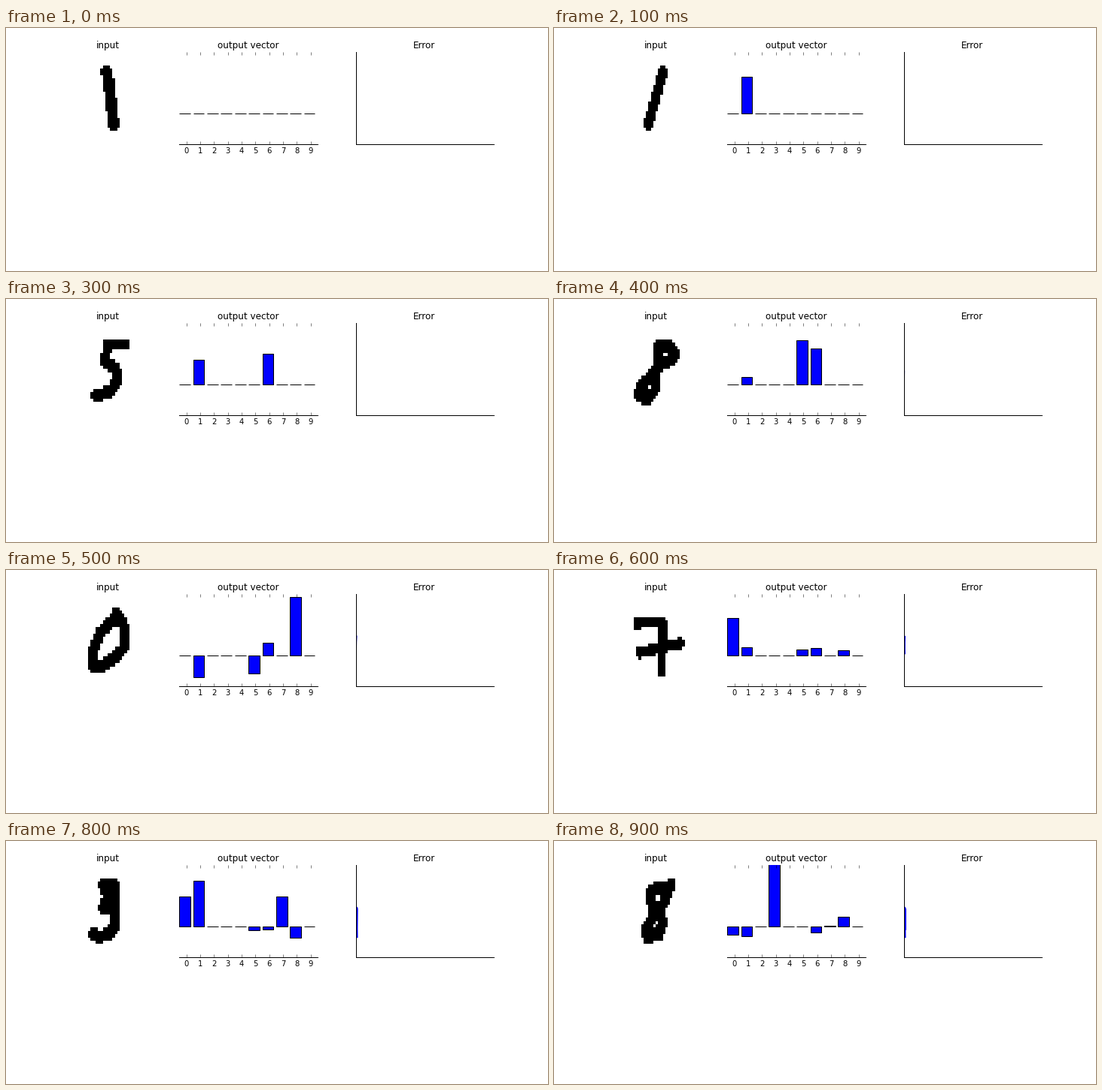
These frames come from a looping animation (720 by 324 pixels, 1 s). A matplotlib script:

```python
import numpy as np
import matplotlib.pyplot as plt
from matplotlib.animation import FuncAnimation

plt.rcParams.update({
    "font.family": "DejaVu Sans", "font.size": 10,
    "axes.titlesize": 12, "axes.titlepad": 5, "axes.linewidth": 1,
})
GRID = 28
BLUE = "#0000ff"


def draw_digit(*strokes, radius=2.0):
    """Rasterise pen strokes, given by key points (x, y) in cells."""
    rows, cols = np.mgrid[:GRID, :GRID] + .5
    cells = np.ones((GRID, GRID))
    for stroke in strokes:
        xs, ys = np.transpose(stroke)
        knots = np.arange(len(stroke))
        path = np.linspace(0, knots[-1], 40 * len(stroke))
        for x, y in zip(np.interp(path, knots, xs), np.interp(path, knots, ys)):
            cells[np.hypot(cols - x, rows - y) < radius] = 0
    return cells


one = draw_digit([(13.7, 6), (15, 13), (16.5, 22)], radius=2.3)
leaning_one = draw_digit([(17, 6), (11, 22)])
upright_one = draw_digit([(16, 6), (14, 22)])
six = draw_digit([(15, 6), (13, 8), (11, 12), (10, 16), (11.5, 19.5), (14.5, 21.8),
                  (18, 19.8), (20.2, 16.5), (19.8, 13), (18, 13), (15.5, 17.5), (15, 20)])
five = draw_digit([(21, 6.5), (14, 6.5), (13, 12), (17, 13.5), (18.5, 17),
                   (15, 21), (9, 22)])
eight = draw_digit([(14.7, 12.5), (14.8, 7), (19.5, 7), (21.9, 9.5), (20, 11.5),
                    (15.5, 12.5), (12, 16), (8, 19.5), (7, 22), (10.5, 23),
                    (14, 20), (14.7, 13)])
zero = draw_digit([(17.5, 6), (20, 8), (15.5, 8.5), (10.5, 12), (8, 17.5), (8.2, 21.7),
                   (12, 22), (17.5, 19), (21, 16), (21.3, 11), (20, 8)])
seven = draw_digit([(6.5, 9.5), (6.5, 8.5), (17, 8.5), (16.6, 23.6)],
                   [(7.5, 17.8), (24, 15)], radius=1.7)
three = draw_digit([(12.2, 6), (14.5, 9.5), (12, 13), (17, 13)],
                   [(12.5, 6), (17, 6), (17.2, 18), (15.5, 20.5), (10.5, 22), (8, 21)])
slim_eight = draw_digit([(20.3, 5.8), (19.5, 8), (17.8, 11), (15, 14.5), (16.9, 17.5),
                         (15.5, 20.8), (10.5, 22), (10, 19.8), (11.5, 17.5),
                         (14.5, 14), (12, 11), (12.3, 8), (16, 6.5), (20, 7)])

# Each step: the digit shown and the non-zero outputs of the network.
STEPS = [
    (one, {}),
    (leaning_one, {1: .6}),
    (six, {1: .94}),
    (five, {1: .4, 6: .5}),
    (eight, {1: .125, 5: .72, 6: .585}),
    (zero, {1: -.355, 5: -.29, 6: .205, 8: .955}),
    (seven, {0: .61, 1: .135, 5: .1, 6: .125, 8: .088}),
    (upright_one, {0: .1, 1: .7, 5: .08, 6: .1, 7: .15, 8: .12}),
    (three, {0: .485, 1: .745, 5: -.065, 6: -.05, 7: .485, 8: -.18}),
    (slim_eight, {0: -.135, 1: -.16, 3: 1.2, 6: -.1, 7: .012, 8: .16}),
]
ERRORS = [.35, .4, .3, .48, .545, .35, .21, .53, .3]

fig = plt.figure(figsize=(10, 4.5), dpi=72, facecolor="white")
grid = fig.add_gridspec(2, 12, left=.125, right=.9, bottom=.1, top=.9,
                        wspace=.0893, hspace=.12)
input_ax = fig.add_subplot(grid[0, :2])
output_ax = fig.add_subplot(grid[0, 3:7])
error_ax = fig.add_subplot(grid[0, 8:])
input_ax.set_title("input")
output_ax.set_title("output vector")
error_ax.set_title("Error", x=.496)

image = input_ax.imshow(one, cmap="gray", vmin=0, vmax=1,
                        interpolation="nearest", aspect="auto")
input_ax.axis("off")

bars = output_ax.bar(np.arange(10) - .5, np.zeros(10), width=.8, align="edge",
                     color=BLUE, edgecolor="black", linewidth=1)
output_ax.set(xlim=(-.5, 9.5), ylim=(-.5, 1), xticks=range(10), yticks=[])
output_ax.tick_params(axis="x", direction="in", top=True, length=4, width=.5, pad=4)
output_ax.spines[["left", "right", "top"]].set_visible(False)

error_line, = error_ax.plot([], [], color=BLUE, linewidth=1)
error_ax.set(xlim=(0, 500), ylim=(0, 1), xticks=[], yticks=[])
error_ax.spines[["right", "top"]].set_visible(False)


def update(step):
    digit, outputs = STEPS[step]
    image.set_data(digit)
    for i, bar in enumerate(bars):
        bar.set_height(outputs.get(i, 0))
    error_line.set_data(range(step), ERRORS[:step])
    return [image, error_line, *bars]


animation = FuncAnimation(fig, update, frames=len(STEPS), interval=100,
                          repeat=True, repeat_delay=0)
plt.show()
```
